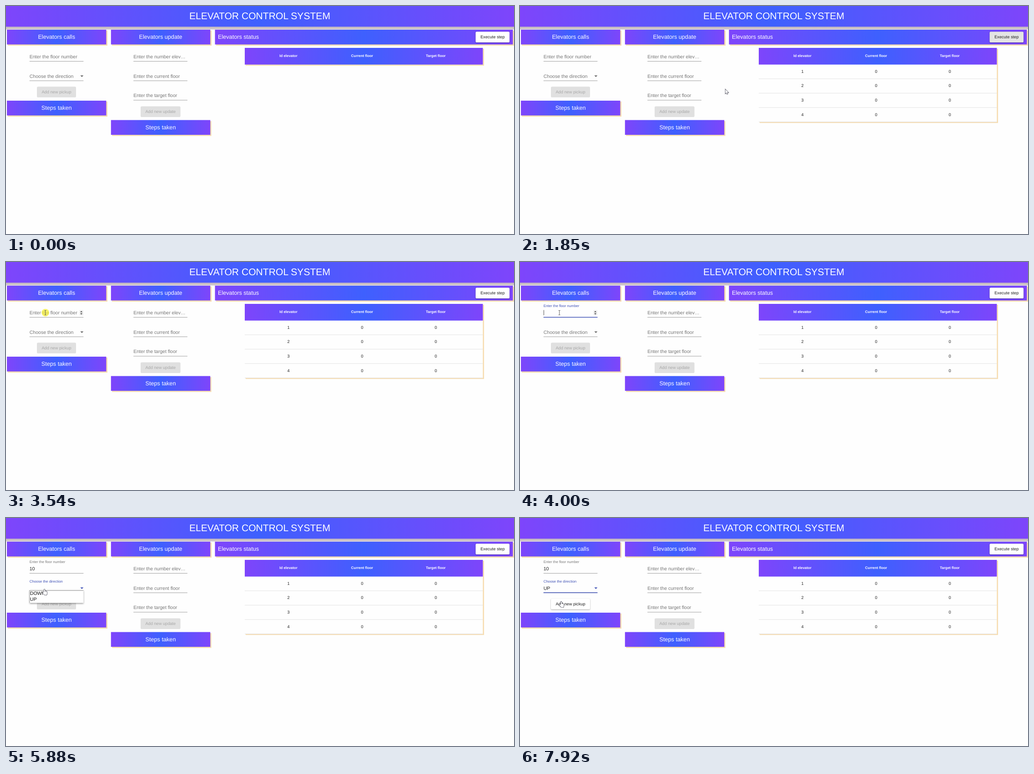
Recreate the animation shown at these times as an HTML page with a canvas. Size 1117 by 501 pixels, loop 8 s.

```html
<!DOCTYPE html>
<html lang="en">
<head>
<meta charset="utf-8">
<title>Elevator control system</title>
<style>
html, body { margin: 0; width: 100%; height: 100%; overflow: hidden; background: #fefefe; }
canvas { display: block; }
</style>
</head>
<body>
<canvas id="stage" width="1117" height="501"></canvas>
<script>
const LOOP = 8000, STEP = 77;
const ctx = document.getElementById('stage').getContext('2d');
const INDIGO = '#3f51b5', GREY = '#777', LINE = '#949494', INK = '#212121', PAPER = '#fefefe';
const FONT = '"Liberation Sans", Arial, sans-serif';
const BODY = 10.56, SMALL = 7.92, BUTTON = 9.24, TITLE = 12.67;
const FIELD_W = 118.7, FIELD_Y = 111.3, FIELD_GAP = 42.75;

// The pointer enters from below and stops at each place in turn.
const ENTRY = { x: 829, y: 772 };
const STOPS = [
  { from: 210, to: 440, x: 1086, y: 136 },
  { from: 610, to: 1220, x: 1062, y: 67, bend: -2.3 },
  { from: 1540, to: 1850, x: 451.5, y: 183 },
  { from: 2000, to: 2310, x: 139, y: 176, bend: -0.34 },
  { from: 2460, to: 3230, x: 86.6, y: 111.3, bend: -0.7 },
  { from: 5100, to: 5340, x: 84.5, y: 156.3 },
  { from: 6030, to: 6420, x: 83, y: 166 },
  { from: 7200, to: 7360, x: 82.5, y: 176 },
  { from: 7680, to: 7920, x: 90.5, y: 183.5 }
];
const CLICKS = [1380, 3540, 5650, 7680];

const clamp = v => Math.max(0, Math.min(1, v));
const mix = (a, b, p) => a + (b - a) * p;
const easeOut = (p, power) => 1 - (1 - clamp(p)) ** power;
const within = (t, a, b) => t >= a && t < b;

function pointerAt(t) {
  if (t < STOPS[0].from) return null;
  let pos = ENTRY;
  for (const { from, to, x, y, bend = 0 } of STOPS) {
    if (t < from) break;
    const count = Math.round((to - from) / STEP) + 1;
    const step = Math.floor((t - from) / (to - from) * (count - 1) + 0.01) + 1;
    const p = easeOut(step / count, 2.5);
    const dx = x - pos.x, dy = y - pos.y, arc = 2 * p * (1 - p) * bend;
    pos = { x: pos.x + dx * p - dy * arc, y: pos.y + dy * p + dx * arc };
  }
  return pos;
}

function text(str, x, y, size, color, align = 'left', weight = 'normal') {
  ctx.font = `${weight} ${size}px ${FONT}`;
  ctx.textRendering = 'geometricPrecision';
  ctx.textAlign = align;
  ctx.fillStyle = color;
  ctx.fillText(str, x, y + size * 0.358 - 0.3);
}

function rect(x, y, w, h, color) {
  ctx.fillStyle = color;
  ctx.fillRect(x, y, w, h);
}

function triangle(x, y, w, h, color) {
  ctx.beginPath();
  ctx.moveTo(x - w / 2, y);
  ctx.lineTo(x + w / 2, y);
  ctx.lineTo(x, y + h);
  ctx.fillStyle = color;
  ctx.fill();
}

function shaded(color, dx, dy, blur, paint) {
  ctx.save();
  ctx.shadowColor = color;
  ctx.shadowOffsetX = dx;
  ctx.shadowOffsetY = dy;
  ctx.shadowBlur = blur;
  paint();
  ctx.restore();
}

function band(x, w) {
  const g = ctx.createLinearGradient(x, 0, x + w, 0);
  ['#7e45fb', '#3e60fe', '#7e45fb'].forEach((c, i) => g.addColorStop(i / 2, c));
  return g;
}

function card(x, y, w, h, fill = band(x, w)) {
  shaded('#f7dcae', 2.4, 2.3, 0.6, () => rect(x, y, w, h, fill));
}

function titled(x, y, label) {
  card(x, y, 218.4, 32.5);
  text(label, x + 109.2, y + 16.1, TITLE, '#fff', 'center');
}

function button(x, y, w, label, on, bg = '#fff') {
  const paint = () => {
    ctx.beginPath();
    ctx.roundRect(x, y, w, 23.5, 2.6);
    ctx.fillStyle = on ? bg : '#e0e0e0';
    ctx.fill();
  };
  if (on) shaded('rgba(0,0,0,.35)', 0, 1, 2.5, paint);
  else paint();
  text(label, x + w / 2, y + 11.7, BUTTON, on ? INK : '#a8a8a8', 'center');
}

// Form field whose label floats up as `lift` goes from 0 to 1.
function field(x, row, label, lift = 0, focus = 0) {
  const y = FIELD_Y + FIELD_GAP * row;
  text(label, x, y - 14.8 * lift, mix(BODY, SMALL, lift), focus ? INDIGO : GREY);
  rect(x, y + 9.7, FIELD_W, 0.9, LINE);
  rect(x + FIELD_W / 2 * (1 - focus), y + 9.4, FIELD_W * focus, 1.5, INDIGO);
}

function header() {
  const g = ctx.createLinearGradient(0, 45, 0, 53);
  g.addColorStop(0, '#c3b7bd');
  g.addColorStop(0.65, '#cfc5c8');
  g.addColorStop(1, PAPER);
  rect(0, 45, 1117, 8, g);
  rect(0, 0, 1117, 45.5, band(0, 1117));
  text('ELEVATOR CONTROL SYSTEM', 558, 22, 21.12, '#fff', 'center');
}

function table(rows) {
  const x = 525, y = 92, w = 523.5, head = 36.7, rowH = 31.6;
  card(x, y, w, head + rowH * rows, PAPER);
  rect(x, y, w, head, band(x, w));
  ['Id elevator', 'Current floor', 'Target floor'].forEach((label, i) => {
    const cx = 621 + 162 * i;
    text(label, cx, y + 17.7, SMALL, '#fff', 'center', 'bold');
    for (let r = 0; r < rows; r++)
      text(i ? '0' : String(r + 1), cx, y + 51.7 + rowH * r, BUTTON, INK, 'center');
  });
  for (let r = 1; r <= rows; r++) rect(x, y + head + rowH * r - 0.8, w, 0.9, '#dfdfdf');
}

function spinner() {
  rect(161.3, 105.8, 8.7, 11.4, '#efefef');
  triangle(165.6, 110.2, 4.8, -2.8, '#444');
  triangle(165.6, 112.8, 4.8, 2.8, '#444');
}

function dropdown(active) {
  const x = 51.5, y = 159, w = 119, rowH = 13.3;
  shaded('rgba(0,0,0,.45)', 0.6, 1.2, 3.5, () => rect(x, y, w, 27.6, '#fff'));
  rect(x, y, w, 0.8, '#888');
  rect(x, y, 0.8, 27.6, '#888');
  ['DOWN', 'UP'].forEach((label, i) => {
    const on = active === i;
    if (on) rect(x + 0.7, y + 0.8 + rowH * i, w - 1.2, rowH, '#1e90ff');
    text(label, 52.8, y + 6.5 + rowH * i, BODY, on ? '#fff' : '#111');
  });
}

const ARROW = new Path2D('M0 0V9.6L2.2 7.6 3.7 11 5.2 10.3 3.8 7.1H6.8Z');
const HAND = new Path2D();
HAND.roundRect(-1.1, 0, 2.3, 9, 1.1);
HAND.roundRect(-1.1, 4.7, 6.6, 8.2, 2);
HAND.roundRect(-3.9, 6.9, 4, 3.2, 1.4);

function pointer({ x, y }, kind, click) {
  if (click) {
    ctx.beginPath();
    ctx.arc(x, y, 8.4, 0, Math.PI * 2);
    ctx.fillStyle = 'rgba(245,240,50,.72)';
    ctx.fill();
  }
  ctx.save();
  ctx.translate(x, y);
  if (kind === 'beam') {
    rect(-0.4, -4.6, 0.9, 9.4, '#555');
    for (const end of [-5.1, 4.5]) rect(-2.2, end, 4.4, 0.8, '#555');
  } else {
    const shape = kind === 'hand' ? HAND : ARROW;
    ctx.strokeStyle = '#2a2a3a';
    ctx.lineWidth = 1.3;
    ctx.stroke(shape);
    ctx.fillStyle = '#fff';
    ctx.fill(shape);
  }
  ctx.restore();
}

function draw(t) {
  const pos = pointerAt(t);
  const over = (x, y, w, h) => pos && within(pos.x, x, x + w) && within(pos.y, y, y + h);
  const open = within(t, 5720, 7750), ready = t >= 7750;
  const typing = within(t, 3615, 5720);
  const overInput = over(52, 104, 119, 17);

  rect(0, 0, 1117, 501, PAPER);
  header();

  const left = 51.7;
  titled(2, 52, 'Elevators calls');
  const lift = easeOut((t - 3580) / 400, 4);
  field(left, 0, 'Enter the floor number', lift, typing ? lift : 0);
  const value = '10'.slice(0, (t >= 4395) + (t >= 4545));
  text(value, left, FIELD_Y, BODY, INK);
  if (within(t, 3690, 5095)) rect(left + 0.2 + 5.6 * value.length, 105.6, 0.8, 11.4, '#222');
  if (overInput || typing) spinner();

  const pick = easeOut((t - 5630) / 400, 4);
  field(left, 1, 'Choose the direction', pick, pick);
  triangle(166.9, 152.4, 7, 3.5, pick ? INDIGO : '#666');
  if (ready) text('UP', left, FIELD_Y + FIELD_GAP, BODY, INK);
  button(68, 177.3, 86, 'Add new pickup', ready);
  titled(2, 208, 'Steps taken');

  titled(230.8, 52, 'Elevators update');
  ['number elev…', 'current floor', 'target floor'].forEach((name, i) =>
    field(280.2, i, 'Enter the ' + name));
  button(296, 220.5, 87.6, 'Add new update', false);
  titled(230.8, 250.6, 'Steps taken');

  card(459.5, 52, 655, 32.5);
  text('Elevators status', 466, 68.1, TITLE, '#fff');
  const press = clamp((t - 1380) / 150) * (1 - clamp((t - 1990) / 200));
  const tone = Math.round(255 - 27 * press);
  button(1032.6, 56.6, 74.6, 'Execute step', true, `rgb(${tone},${tone},${tone})`);
  table(t >= 1530 ? 4 : 0);

  if (open) dropdown(t >= 7195 ? 1 : t >= 6260 ? 0 : -1);

  if (pos) {
    const overSelect = over(52, 147, 119, 17) && !(open && t >= 6030);
    const overButton = over(1032, 56, 75, 24) || (ready && over(68, 177, 86, 24));
    const kind = overInput ? 'beam' : overSelect || overButton ? 'hand' : 'arrow';
    pointer(pos, kind, CLICKS.some(at => within(t, at, at + 2 * STEP)));
  }
}

function tick() {
  draw(performance.now() % LOOP);
  requestAnimationFrame(tick);
}
tick();
</script>
</body>
</html>
```
